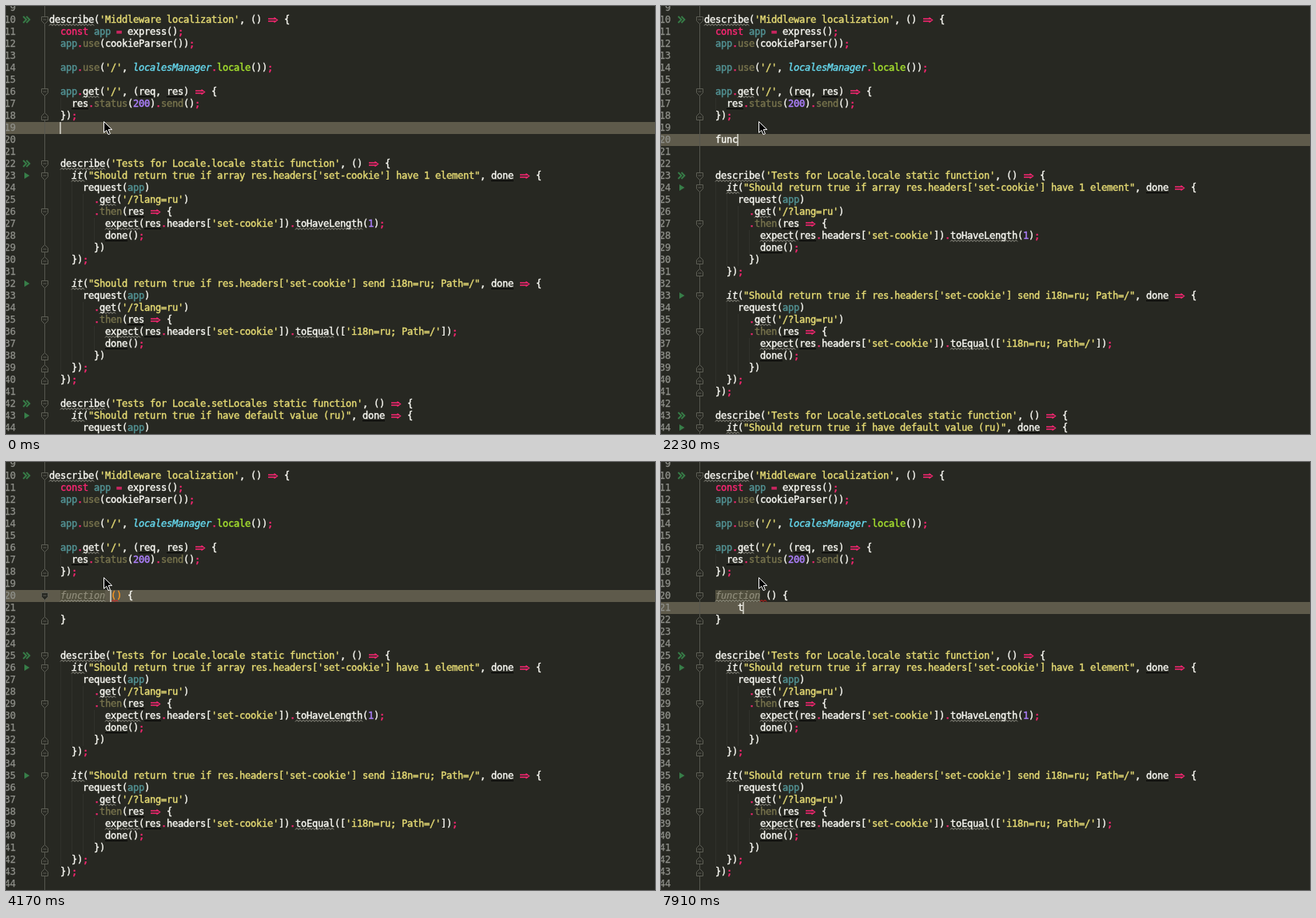
An HTML page for the animation above (8000 ms loop, 812 by 535 pixels).

```html
<!DOCTYPE html>
<html lang="en">
<head>
<meta charset="utf-8">
<title>Code editor</title>
<style>
  html, body { margin: 0; width: 100%; height: 100%; overflow: hidden; background: #272822; }
  svg { display: block; }
  text {
    font: 12px "DejaVu Sans Mono", "Liberation Mono", monospace; white-space: pre;
    color: #f8f8f2; fill: currentColor; stroke: currentColor; stroke-width: .4;
  }
  text.pink { color: #f92672; }
  text.str { color: #e6db74; }
  text.num { color: #ae81ff; }
  text.app { color: #529294; }
  text.dim { color: #77734d; }
  text.blue { color: #66d9ef; font-style: italic; }
  text.green { color: #a6e22e; }
  text.it { font-style: italic; }
  text.gutter { color: #8f908a; stroke-width: .25; }
  text.orange { color: #fd971f; }
  text.unused { color: #918e7c; font-style: italic; stroke-width: .2; }
  text.item { color: #a0a3a5; stroke-width: .2; }
  text.hit { color: #a067ae; }
  text.bold { font-weight: bold; stroke: none; }
  text.icon { font-size: 9px; color: #3d2d18; }
  text.hint { font: 11.75px "Liberation Sans", Arial, sans-serif; color: #c3c5c6; stroke: none; }
  text.link { color: #5a97e8; }
  path { fill: none; }
  .wave { stroke: #b9b8ac; stroke-width: .8; }
  .red { stroke: #f01818; stroke-width: 1; }
  .under { stroke: #000; }
  .arrow { stroke: #f92672; stroke-width: 1.3; }
  .fold { fill: #272822; stroke: #5c5d54; }
  .run { fill: #377d48; }
  .chevron { stroke: #377d48; stroke-width: 1.8; }
  .guide { stroke: #30312b; }
</style>
</head>
<body>
<svg id="stage" width="812" height="535" viewBox="0 0 812 535">
  <defs>
    <filter id="shadow" x="-10%" y="-20%" width="120%" height="150%">
      <feDropShadow dx="0" dy="6" stdDeviation="5" flood-color="#000" flood-opacity=".45"/>
    </filter>
  </defs>
  <rect width="812" height="535" fill="#272822"/>
  <rect id="band" width="812" height="15" fill="#5e5a4b"/>
  <path d="M48.5 0V535" stroke="#55564e"/>
  <g id="numbers"></g>
  <g id="top"></g>
  <g id="bottom"></g>
  <g id="typing"></g>
  <g id="body">
    <rect id="unusedBox" x="68" y="160" width="56" height="15" fill="#504e3d"/>
  </g>
  <g id="popup">
    <g filter="url(#shadow)" opacity=".96">
      <rect x="59" y="175" width="446" height="69" fill="#3c3f41"/>
      <rect x="59" y="175" width="446" height="18" fill="#4a4f53"/>
      <rect x="59" y="229" width="446" height="15" fill="#45494b"/>
    </g>
  </g>
  <rect id="caret" width="1.2" height="15" fill="#f8f8f0"/>
  <path id="mouse" d="M122.5 144.5V158.3L125.7 155.3L128 160.6L130.4 159.6L128.2 154.4H132.6Z"
        style="fill:#000;stroke:#fff"/>
</svg>
<script>
const $ = id => document.getElementById(id);
const LEFT = 54, CELL = 7, ROW = 15, LOOP = 8000;
const colX = col => LEFT + CELL * col;
const rowY = row => 10 + ROW * (row - 10);

function add(parent, tag, attrs, content = '') {
  const el = document.createElementNS('http://www.w3.org/2000/svg', tag);
  for (const key in attrs) el.setAttribute(key, attrs[key]);
  el.textContent = content;
  parent.append(el);
  return el;
}
const path = (parent, cls, d) => add(parent, 'path', { class: cls, d });

// Monospaced text on a fixed cell grid
const gridX = (x, str) => [...str].map((_, i) => x + CELL * i).join(' ');
const mono = (parent, cls, x, y, str) => add(parent, 'text', { class: cls, x: gridX(x, str), y }, str);

const wave = (parent, cls, x, y, width) =>
  path(parent, cls, `M${x} ${y + 14.5}` + 'l2 -2l2 2'.repeat(Math.round(width / 4)));

const styles = {};
const setStyle = (cls, words) => words.split(' ').forEach(w => styles[w] = cls);
setStyle('pink', 'const function . ; =');
setStyle('dim', 'use status send then');
setStyle('app', 'app');
setStyle('blue', 'localesManager');
setStyle('green', 'locale');
setStyle('it', 'it');
const waved = new Set(['describe', 'it', 'get', 'expect', 'toHaveLength', 'toEqual']);
const lined = new Set(['res', 'req', 'done']);

function styleOf(word) {
  if (/^['"]/.test(word)) return 'str';
  if (/^\d/.test(word)) return 'num';
  return styles[word] || 'plain';
}

function codeLine(parent, row, line) {
  const y = rowY(row);
  for (const { 0: word, index } of line.matchAll(/"[^"]*"|'[^']*'|=>|\w+|[^\s\w]/g)) {
    const x = colX(index), width = CELL * word.length;
    if (word === '=>') {
      path(parent, 'arrow', `M${x + 1} ${y + 6}h10M${x + 1} ${y + 9}h10M${x + 8.5} ${y + 4.5}l4 3l-4 3`);
      continue;
    }
    if (lined.has(word)) path(parent, 'under', `M${x} ${y + 13.5}h${width}`);
    mono(parent, styleOf(word), x, y + 11, word);
    if (waved.has(word)) wave(parent, 'wave', x, y, width);
  }
}

const foldOpen = (parent, row) =>
  path(parent, 'fold', `M44.5 ${rowY(row) + 3.5}h8v5l-4 4l-4 -4zm2 3.5h4`);
const foldClose = (parent, row) =>
  path(parent, 'fold', `M44.5 ${rowY(row) + 12.5}h8v-5l-4 -4l-4 4zm2 -3.5h4`);

function runIcon(parent, row, double) {
  const y = rowY(row) + 3;
  if (double) path(parent, 'chevron', `M21.5 ${y}l4 4l-4 4M25.5 ${y}l4 4l-4 4`);
  else path(parent, 'run', `M23 ${y}l6.5 4l-6.5 4z`);
}

const guide = (parent, col, from, to) =>
  path(parent, 'guide', `M${colX(col) + .5} ${rowY(from)}V${rowY(to + 1)}`);

function block(parent, first, source) {
  source.split('\n').forEach((line, i) => {
    const row = first + i;
    codeLine(parent, row, line);
    if (/\{$/.test(line)) foldOpen(parent, row);
    if (/^\s*\}/.test(line)) foldClose(parent, row);
    if (/^\s*(describe|it)\(/.test(line)) runIcon(parent, row, line.includes('describe'));
  });
}

for (let n = 9; n <= 44; n++) {
  const label = String(n);
  mono($('numbers'), 'gutter', 12 - CELL * label.length, rowY(n) + 11, label);
}

guide($('top'), 2, 17, 17);
block($('top'), 10, `describe('Middleware localization', () => {
  const app = express();
  app.use(cookieParser());

  app.use('/', localesManager.locale());

  app.get('/', (req, res) => {
    res.status(200).send();
  });`);

const bottom = $('bottom');
guide(bottom, 2, 23, 39);
for (const start of [24, 33]) {
  guide(bottom, 4, start, start + 5);
  guide(bottom, 6, start + 1, start + 5);
  guide(bottom, 8, start + 3, start + 4);
}
block(bottom, 22, `  describe('Tests for Locale.locale static function', () => {
    it("Should return true if array res.headers['set-cookie'] have 1 element", done => {
      request(app)
        .get('/?lang=ru')
        .then(res => {
          expect(res.headers['set-cookie']).toHaveLength(1);
          done();
        })
    });

    it("Should return true if res.headers['set-cookie'] send i18n=ru; Path=/", done => {
      request(app)
        .get('/?lang=ru')
        .then(res => {
          expect(res.headers['set-cookie']).toEqual(['i18n=ru; Path=/']);
          done();
        })
    });
  });

  describe('Tests for Locale.setLocales static function', () => {
    it("Should return true if have default value (ru)", done => {
      request(app)`);

// Parts shown only inside a time window
const timed = [];
const during = (from, to, ...els) => els.forEach(el => timed.push({ el, from, to }));

const popup = $('popup');
mono(popup, 'item bold hit', 68, 188, 'func');
mono(popup, 'item bold', 96, 188, 'tion');
for (const [y, before, after] of [[206, 'compiled', 'tions Messageformat (i18n.js)'], [224, 'is', 'tion(arg)']]) {
  const hitX = 96 + CELL * before.length;
  add(popup, 'circle', { cx: 69, cy: y - 4, r: 6.5, fill: '#a06f2e' });
  add(popup, 'text', { class: 'icon', x: 66.3, y: y - .8 }, 'f');
  mono(popup, 'item', 96, y, before);
  mono(popup, 'item hit', hitX, y, 'Func');
  mono(popup, 'item', hitX + 28, y, after);
}
mono(popup, 'item', 491, 225, '*');
add(popup, 'text', { class: 'hint', x: 60, y: 241 },
  'Press ^. to choose the selected (or first) suggestion and insert a dot afterwards');
add(popup, 'text', { class: 'hint link', x: 477, y: 241, 'text-decoration': 'underline' }, '>>');
add(popup, 'text', { class: 'hint link', x: 493, y: 241 }, 'π');
during(2830, 3430, popup);

const body = $('body');
mono(body, '', colX(14), 171, '{');
mono(body, '', colX(2), 201, '}');
during(3430, LOOP, body);
during(3430, 3730, mono(body, 'pink', colX(2), 171, 'function'));
during(3730, LOOP, $('unusedBox'), mono(body, 'unused', colX(2), 171, 'function'),
  foldOpen(body, 20), foldClose(body, 22));
during(3870, LOOP, wave(body, 'wave', colX(2), 160, 56));
during(3430, 4620, mono(body, 'orange', colX(11), 171, '()'));
during(4620, LOOP, mono(body, '', colX(11), 171, '()'));
during(4170, 4620, wave(body, 'red', 132, 160, 6));
during(4620, 7910, path(body, 'red', 'M130.5 162V174.5M129.5 174h3'));
during(4620, LOOP, wave(body, 'red', 124, 160, 7));
during(7910, LOOP, mono(body, '', colX(6), 186, 't'));

const typing = [[1040, 'f'], [1330, 'fi'], [1630, 'f'], [1930, 'fu'], [2080, 'fun'], [2230, 'func'], [3430, '']];
typing.forEach(([from, word], i) => {
  const next = typing[i + 1];
  if (next) during(from, next[0], mono($('typing'), '', colX(2), 171, word));
});

// Caret: start, column, row, visible
const caretSteps = [
  [0, 2, 19, 1], [300, 2, 20, 1],
  ...typing.map(([from, word]) => [from, 2 + word.length, 20, 1]).slice(0, -1),
  [2830, 6, 20, 0], [3430, 11, 20, 1], [4620, 6, 21, 1],
  ...[5370, 5810, 6410, 6860, 7310].map((from, i) => [from, 6, 21, i % 2]),
  [7910, 7, 21, 1]
];

const show = (el, on) => el.style.display = on ? '' : 'none';

function draw() {
  const t = performance.now() % LOOP;
  for (const { el, from, to } of timed) show(el, t >= from && t < to);
  const [, col, row, on] = caretSteps.findLast(step => t >= step[0]);
  const caret = $('caret');
  caret.setAttribute('x', colX(col) - .6);
  caret.setAttribute('y', rowY(row));
  show(caret, on);
  $('band').setAttribute('y', rowY(row));
  const pushed = t < 300 ? 0 : t < 3430 ? 1 : 3;
  bottom.setAttribute('transform', `translate(0 ${pushed * ROW})`);
  requestAnimationFrame(draw);
}
draw();
</script>
</body>
</html>
```
